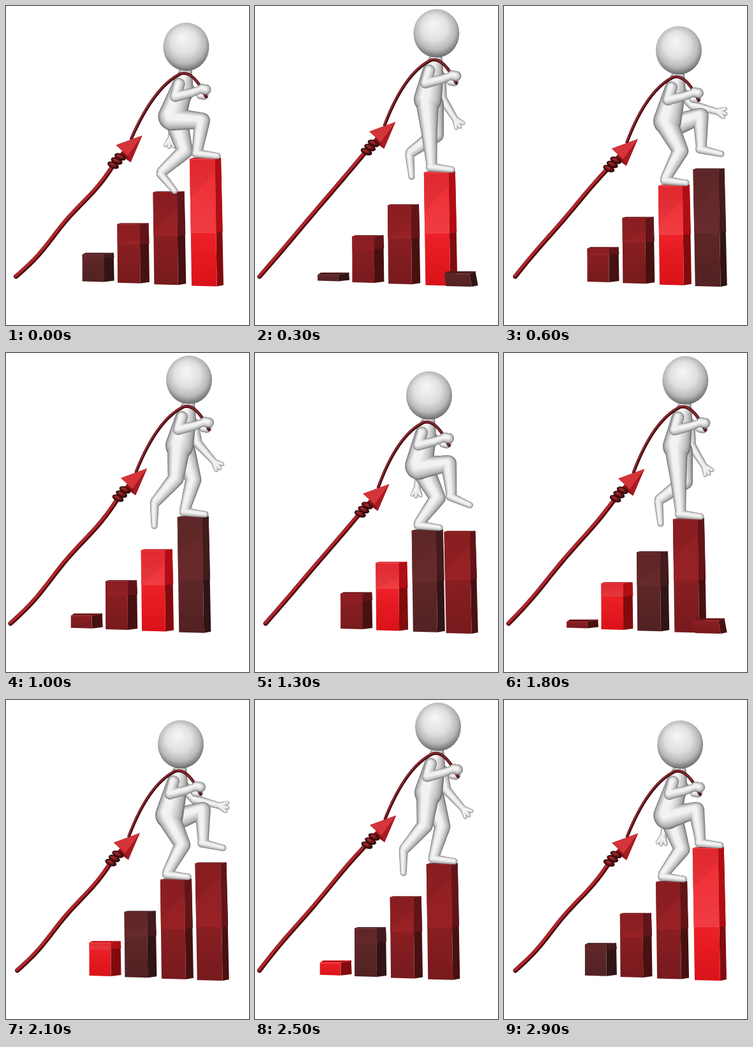
Recreate the animation shown at these times as an HTML page with a canvas. Size 381 by 500 pixels, loop 3000 ms.

```html
<!DOCTYPE html>
<html lang="en">
<head>
<meta charset="utf-8">
<title>Climbing the bars</title>
<style>
html, body { margin: 0; width: 100%; height: 100%; overflow: hidden; background: #fff; }
canvas { display: block; width: 381px; height: 500px; }
</style>
</head>
<body>
<canvas id="stage" width="381" height="500"></canvas>
<script>
const g = document.getElementById('stage').getContext('2d');
const LOOP = 3000, CYCLE = 1500, STEP = 750, TICK = 100;
const mod = (a, n) => ((a % n) + n) % n;
const lerp = (a, b, k) => a + (b - a) * k;
const mix = (p, q, k) => p.map((v, i) => lerp(v, q[i], k));
const add = ([x, y], dx, dy) => [x + dx, y + dy];
const polar = ([x, y], r, a) => [x + r * Math.cos(a), y + r * Math.sin(a)];
const wave = (t, period, peak) => Math.cos(2 * Math.PI * (t - peak) / period);

function poly(pts, fill) {
  g.beginPath();
  pts.forEach(p => g.lineTo(...p));
  g.closePath();
  g.fillStyle = fill;
  g.fill();
}

function vertical(y0, y1, from, to) {
  const f = g.createLinearGradient(0, y0, 0, y1);
  f.addColorStop(0, from);
  f.addColorStop(1, to);
  return f;
}

// ---- Bars: each rises at the right, then drifts left while sinking.

const tone = (sat, light) => k => `hsl(358 ${sat}% ${light * k}%)`;
const red = tone(64, 34);
const PAINTS = [tone(85, 55), tone(42, 27), red, red];

function barAt(s) {
  const x = Math.min(296.5, 288 - 77.5 * s + 1.2 * s * s);
  const base = 440 - (298 - x) * 0.042;
  const top = s < -0.1
    ? base - 209 * Math.pow(Math.max(0, s + 0.48) / 0.38, 0.85)
    : 238 + 72 * s - 2.6 * s * s + Math.max(0, s - 2.45) * 130;
  return { x, base, top };
}

function bar(s, paint) {
  const { x, base, top } = barAt(s);
  if (top > base - 5) return;
  const xe = x + 49, xr = xe - 9 - (298 - x) * 0.037;
  const lip = Math.max(1.5, (top - 300) / 32), y = top + lip;
  const lean = Math.max(0, (x - 150) * 0.022);
  const split = Math.max(y, Math.min(base, 356 + 0.0014 * (288 - x) ** 2));
  const dx = lean * (split - y) / (base - y);
  const diag = h => Math.min(split, y + h);

  poly([[xr, y], [xe, top], [xe + lean + 1, base - 2], [xr + lean, base]], paint(0.5));
  poly([[xr, y], [xe, top], [xe + dx + 1, split - 2], [xr + dx, split]], paint(0.68));
  poly([[x, y], [x + 5, top], [xe, top], [xr, y]], paint(0.75));
  poly([[x, y], [xr, y], [xr + lean, base], [x + lean, base - 1]],
    vertical(split, base, paint(0.96), paint(0.84)));
  poly([[x, y], [xr, y], [xr + dx, split], [x + dx, split]],
    vertical(y, split, paint(1), paint(1.07)));
  poly([[x, y], [xr, y], [xr, diag(22)], [x, diag(62)]], 'rgba(40,0,0,.06)');
  poly([[x, y], [xr, y], [xr, y + 1], [x, y + 1]], paint(1.15));
}

function bars(t) {
  PAINTS.forEach((paint, i) => {
    const age = mod(t - i * STEP + 500, LOOP) - 500;
    if (age < -200) bar((age + LOOP) / 1000, paint);
    bar(age / 1000, paint);
  });
}

// ---- Climber

// Shaded tubes: each is a chain of [x, y, radius]; tubes in one call blend together.
function tubes(...chains) {
  const layers = 10;
  for (let l = 0; l < layers; l++) {
    const u = l / (layers - 1), k = 1 - 0.72 * u;
    const v = Math.round(118 + 124 * Math.sqrt(u));
    g.fillStyle = `rgb(${v},${v},${v})`;
    g.beginPath();
    for (const chain of chains) {
      for (let i = 1; i < chain.length; i++) {
        const a = chain[i - 1], b = chain[i];
        const n = Math.ceil(Math.hypot(b[0] - a[0], b[1] - a[1])) + 1;
        for (let j = 0; j <= n; j++) {
          const [x, y, r] = mix(a, b, j / n);
          const off = (1 - k) * r * 0.3;
          g.moveTo(x - off + r * k, y - off);
          g.arc(x - off, y - off, r * k, 0, 7);
        }
      }
    }
    g.fill();
  }
}

// The planted foot rides its bar.
function planted(s) {
  const { x, top } = barAt(s);
  return [x + 12, top - 11];
}

function footAt(t) {
  const p = mod(t + 100, CYCLE) - 100;
  if (p < 650) return { ankle: planted(p / 1000), pitch: 0.12 };
  const u = (p - 650) / STEP, arch = Math.sin(Math.PI * u);
  const path = mix(planted(0.65), planted(-0.1), u);
  return {
    ankle: add(path, -40 * arch ** 3 - 14 * Math.sin(2 * Math.PI * u), -15 * arch),
    pitch: 0.12 + 2 * arch * Math.sqrt(1 - u)
  };
}

// Two bones of equal length with the knee bending forward.
function kneeAt(hip, ankle, bone = 48) {
  const dx = ankle[0] - hip[0], dy = ankle[1] - hip[1], d = Math.hypot(dx, dy);
  const out = Math.sqrt(Math.max(0, bone * bone - d * d / 4)) / d;
  return add(mix(hip, ankle, 0.5), dy * out, -dx * out);
}

function leg(t, hip) {
  const { ankle, pitch } = footAt(t);
  const heel = add(ankle, -2, 4), toe = polar(heel, 34, pitch);
  return [
    [[...hip, 18], [...kneeAt(hip, ankle), 12.5], [...ankle, 8.5]],
    [[...heel, 7], [...toe, 5]]
  ];
}

function farArm(t, shoulder) {
  const swing = wave(t, CYCLE, 675);
  const elbow = polar(shoulder, 34 - 10 * swing, 1.48 - 0.66 * swing);
  const aim = 1.01 - 0.8 * swing;
  const hand = polar(elbow, 40, aim);
  const fingers = [-0.6, 0, 0.5].map(a => [[...hand, 5.5], [...polar(hand, 13, aim + a), 2.8]]);
  tubes([[...shoulder, 9], [...elbow, 7.5], [...hand, 5]], ...fingers);
}

function skull([x, y]) {
  const f = g.createRadialGradient(x - 5, y - 14, 3, x - 1, y - 3, 42);
  [[0, 244], [0.45, 224], [0.75, 184], [1, 98]].forEach(([k, v]) => f.addColorStop(k, `rgb(${v},${v},${v})`));
  g.beginPath();
  g.ellipse(x, y, 36, 38, 0, 0, 7);
  g.fillStyle = f;
  g.fill();
}

function climber(t, head, tip) {
  const at = (dx, dy, r) => [...add(head, dx, dy), r];
  const pelvis = [264 + 8 * wave(t, STEP, 240), 163 - 18 * wave(t, STEP, 260)];
  farArm(t, add(head, 6, 68));
  tubes(...leg(t + STEP, add(pelvis, 7, 8)));
  tubes([at(0, 36, 9), at(-6, 63, 17), [...pelvis, 22]], ...leg(t, add(pelvis, -1, 4)));
  tubes([at(22, 76, 6), at(28, 76, 7)]);
  pull(head, tip);
  tubes(
    [at(-11, 58, 9), at(-17, 78, 8.5), at(8, 72, 7), at(22, 67, 6)],
    [at(25, 66, 8), at(31, 67, 8)]
  );
  skull(head);
}

// ---- Rope and arrow

function cord(path, width, dark, light) {
  g.lineCap = g.lineJoin = 'round';
  [[width, dark, 0], [width * 0.55, light, -0.8]].forEach(([w, color, off]) => {
    g.save();
    g.translate(off, off);
    g.lineWidth = w;
    g.strokeStyle = color;
    g.stroke(path);
    g.restore();
  });
}

function pull(head, tip) {
  const path = new Path2D();
  path.moveTo(...add(tip, -17, 5));
  path.quadraticCurveTo(...add(head, -50, 62), ...add(head, -8, 42));
  path.quadraticCurveTo(...add(head, 11, 37), ...add(head, 31, 78));
  cord(path, 4.8, '#3f0b10', '#8a2a31');
}

function arrow(t, tip) {
  const end = [12.5 - 5.5 * wave(t, STEP, 260), 424];
  const knot = add(tip, -41, 40);
  const sag = 2 + 4.5 * wave(t, 1000, 0);
  const tail = new Path2D();
  for (let s = 0; s <= 1; s += 0.04) {
    const d = sag * (0.65 * Math.sin(Math.PI * s) + 0.35 * Math.sin(3 * Math.PI * s));
    tail.lineTo(...add(mix(end, knot, s), 0.75 * d, 0.66 * d));
  }
  tail.lineTo(...add(tip, -28, 26));
  cord(tail, 7.2, '#4a080c', '#b8242b');

  const [left, notch, right] = [add(tip, -41, 15), add(tip, -23, 32), add(tip, -18, 42)];
  poly([tip, left, add(tip, -31, 24), add(tip, -35, 30), right], '#8d1318');
  poly([tip, left, notch], '#d4343a');
  poly([tip, notch, right], '#a81b21');

  for (let i = -1; i <= 1; i++) {
    const c = add(knot, 1 + 5.5 * i, -6.5 * i);
    for (let k = 0; k < 3; k++) {
      g.beginPath();
      g.ellipse(c[0] - k * 0.7, c[1] - k * 0.7, 9.5 - 2.6 * k, 5 - 1.7 * k, 0.4, 0, 7);
      g.fillStyle = red(0.35 + 0.4 * k);
      g.fill();
    }
  }
}

function draw(t) {
  const bob = 56 - 14 * wave(t, STEP, 260);
  const head = [281 + 8 * wave(t, STEP, 165), bob];
  const tip = [215.5 + 5.7 * wave(t, STEP, 230), bob + 139];
  g.clearRect(0, 0, 381, 500);
  bars(t);
  climber(t, head, tip);
  arrow(t, tip);
}

const start = performance.now();
let shown = -1;
function tick() {
  const t = Math.floor(mod(performance.now() - start, LOOP) / TICK) * TICK;
  if (t !== shown) draw(shown = t);
  requestAnimationFrame(tick);
}
tick();
</script>
</body>
</html>
```
